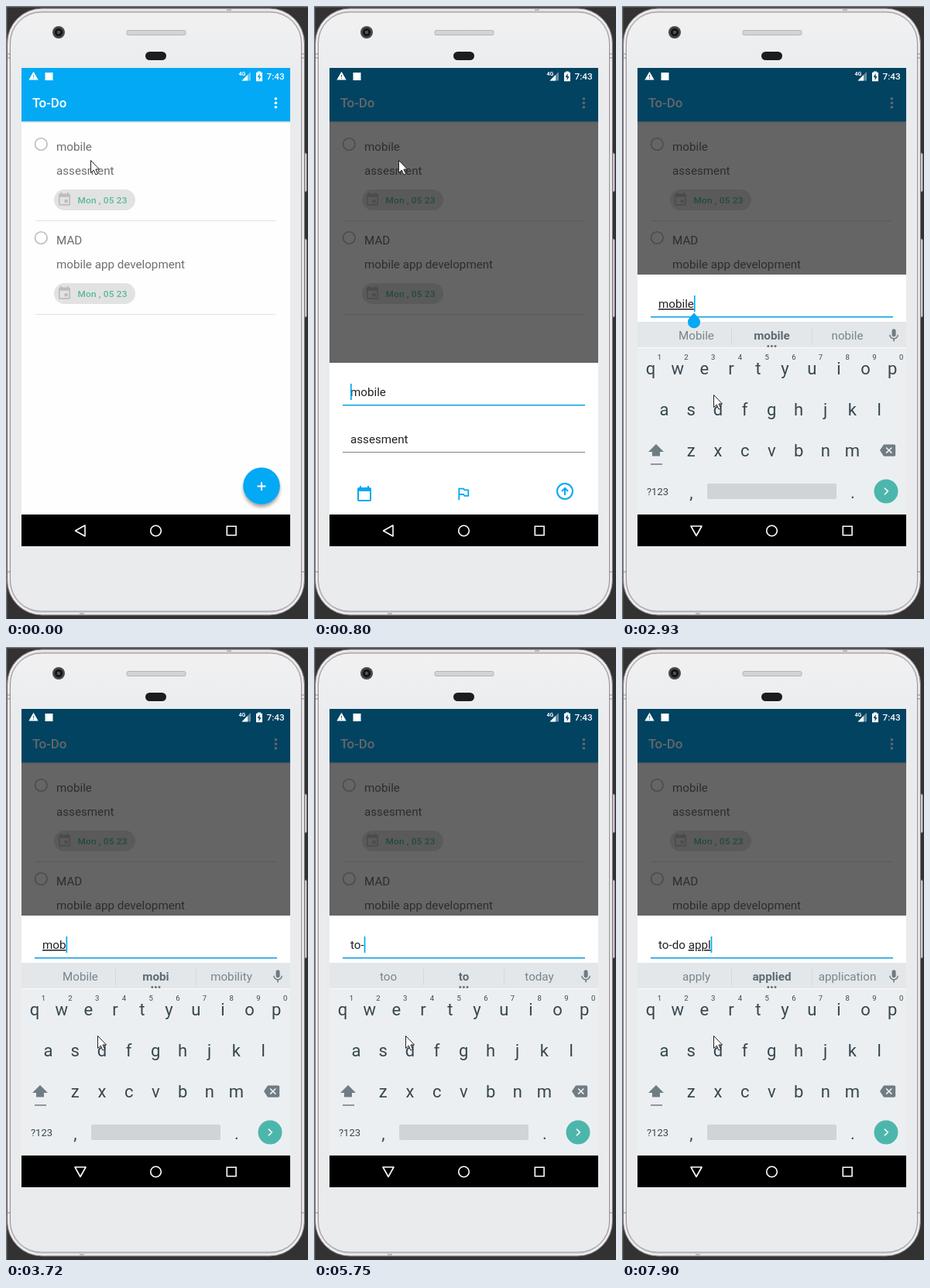
Animation of 390x792 px, one loop 8 s. Source, as an HTML page:

```html
<!DOCTYPE html>
<html lang="en">
<meta charset="utf-8">
<title>To-Do</title>
<style>
  html, body { margin: 0; width: 100%; height: 100%; overflow: hidden; background: #323232 }
  svg { display: block; font: 15.18px Roboto, sans-serif }
  .line { fill: none; stroke-width: 1.6 }
  .mid { text-anchor: middle }
  #composing { text-decoration: underline }
  #field { white-space: pre }
</style>
<svg width="390" height="792" viewBox="0 0 390 792">
  <defs>
    <clipPath id="screen"><path d="M20 80h347v577H20z"/></clipPath>
    <linearGradient id="shell" x2="0" y2="1">
      <stop stop-color="#f1f1f2"/><stop offset=".12" stop-color="#e9ebed"/><stop offset="1" stop-color="#e9ebed"/>
    </linearGradient>
    <filter id="soft" x="-30%" y="-30%" width="160%" height="160%"><feGaussianBlur stdDeviation="2.2"/></filter>
    <path id="calendar" fill-rule="evenodd" d="M19 3h-1V1h-2v2H8V1H6v2H5a2 2 0 0 0-2 2v14a2 2 0 0 0 2 2h14a2 2 0 0 0 2-2V5a2 2 0 0 0-2-2zm0 16H5V8h14z"/>
  </defs>

  <!-- phone -->
  <path fill="#323232" d="M0 0h390v792H0z"/>
  <path class="line" stroke="#777" d="M0 .8h390M.5 0v792"/>
  <g fill="#cfcacd" stroke="#77747a">
    <rect x="383" y="190" width="5.5" height="50" rx="2"/>
    <rect x="383" y="301" width="5.5" height="101" rx="2"/>
    <rect x="1.5" y="3" width="384" height="784" rx="45" fill="#d8d3d6"/>
  </g>
  <rect x="3.5" y="5" width="380" height="780" rx="43" fill="none" stroke="#f5f2f4" stroke-width="1.5"/>
  <rect x="5.5" y="8" width="376" height="774" rx="40" fill="url(#shell)" stroke="#989498"/>
  <path stroke="#8b888c" d="M2 62h4M2 67h4M381 62h4M381 67h4M2 731h4M381 731h4M285 5h6M95 785h6"/>
  <circle cx="68" cy="34" r="8" fill="#48484a"/>
  <circle cx="68" cy="34" r="5.2" fill="#161618"/>
  <circle cx="68" cy="34" r="2.2" fill="#505459"/>
  <rect x="156" y="31.5" width="76" height="6" rx="2" fill="#d3d4d5" stroke="#b4b5b6"/>
  <rect x="180" y="59" width="27" height="11" rx="5.5" fill="#1b1d1f"/>

  <!-- task list -->
  <path fill="#fefefe" d="M20 80h347v577H20z"/>
  <path fill="#03a9f4" d="M20 80h347v69H20z"/>
  <path fill="#c8dbe4" d="M20 149h347v1.6H20z"/>
  <text x="34" y="131" font-size="16.87" font-weight="500" fill="#fff">To-Do</text>
  <g fill="#fff"><circle cx="348.4" cy="119.7" r="1.8"/><circle cx="348.4" cy="125.2" r="1.8"/><circle cx="348.4" cy="130.7" r="1.8"/></g>
  <g id="tasks"></g>
  <circle cx="330" cy="624" r="23.5" opacity=".35" filter="url(#soft)"/>
  <circle cx="330" cy="620" r="23.8" fill="#03a9f4"/>
  <path stroke="#fff" stroke-width="2" d="M324.5 620.5h11M330 615v11"/>

  <path id="dim" d="M20 80h347v577H20z"/>

  <!-- status bar -->
  <g fill="#fff">
    <path fill-rule="evenodd" transform="translate(28.8 83.7) scale(.56)" d="M1 21h22L12 2zm12-3h-2v-2h2zm0-4h-2v-4h2z"/>
    <path d="M50.5 86h10v10h-10z"/>
    <text x="300.5" y="90" font-size="7" font-weight="700">4G</text>
    <path opacity=".4" d="M316 85v11.5h-11.5z"/>
    <path d="M312 89v7.5h-7.5z"/>
    <path fill-rule="evenodd" d="M325 84.5h4v1.3h2v11.4h-8V85.800h2zM327.600 87l-3 5h2v4l3-5h-2z"/>
    <text x="336.500" y="95" font-size="11.8" font-weight="500">7:43</text>
  </g>

  <g clip-path="url(#screen)">
    <!-- edit sheet -->
    <g id="sheet">
      <path fill="#fff" d="M20 461h347v320H20z"/>
      <path stroke="#0a9ee2" stroke-width="1.6" d="M37 515.700h313"/>
      <path stroke="#808080" d="M37 576.500h313"/>
      <text id="hint" x="47" y="504" fill="#999">Title</text>
      <text id="field" x="47" y="504" fill="#212121"><tspan id="plain"></tspan><tspan id="composing"></tspan></text>
      <rect id="caret" y="488" width="1.700" height="21" fill="#03a9f4"/>
      <text x="47" y="565" fill="#212121">assesment</text>
      <g fill="#03a9f4">
        <use href="#calendar" x="53" y="619"/>
        <path fill-rule="evenodd" transform="translate(181.800 619) scale(.92)" d="M14 6l-1-2H5v17h2v-7h5l1 2h7V6zm4 8h-4l-1-2H7V6h5l1 2h5z"/>
      </g>
      <g class="line" stroke="#03a9f4" style="stroke-width:2"><circle cx="324" cy="627" r="10"/><path d="M324 632v-9M320 627l4-4 4 4"/></g>
    </g>

    <!-- keyboard -->
    <g id="keyboard">
      <path fill="#eceff1" d="M20 408h347v249H20z"/>
      <path fill="#e3e7e9" d="M20 408h347v33H20z"/>
      <path stroke="#f8f9fa" d="M20 441.500h347"/>
      <path stroke="#d2d8db" d="M141.500 416v21M245.500 416v21"/>
      <g class="mid" fill="#7a858b">
        <text id="left" x="96" y="431"></text>
        <text id="middle" x="193.500" y="431" font-weight="700" fill="#5e6b72"></text>
        <text id="right" x="291" y="431"></text>
      </g>
      <path id="dots" stroke="#5e6b72" stroke-width="2.600" d="M187.500 439.500h2.600m2 0h2.600m2 0h2.600"/>
      <g fill="#6f7c83">
        <path transform="translate(341 415.500) scale(.84)" d="M12 14a3 3 0 0 0 3-3V5a3 3 0 0 0-6 0v6a3 3 0 0 0 3 3zm5.300-3c0 3-2.500 5.100-5.300 5.100S6.700 14 6.700 11H5c0 3.400 2.700 6.200 6 6.700V21h2v-3.300c3.300-.5 6-3.300 6-6.700z"/>
        <path d="M44 566l10 10h-5v5.500H39V576h-5zM37 591.200h15v1.600H37z"/>
        <path fill-rule="evenodd" transform="translate(333 564) scale(.84)" d="M22 3H7c-.7 0-1.200.4-1.600.9L0 12l5.400 8.100c.4.5.9.9 1.600.9h15a2 2 0 0 0 2-2V5a2 2 0 0 0-2-2zm-3 12.600L17.600 17 14 13.400 10.400 17 9 15.600 12.600 12 9 8.400 10.400 7 14 10.600 17.600 7 19 8.400 15.400 12z"/>
      </g>
      <g id="keys" class="mid" fill="#37474f"></g>
      <rect x="110" y="617" width="167" height="20" rx="2" fill="#cfd4d6"/>
      <circle cx="341" cy="627" r="15.500" fill="#4db6ac"/>
      <path class="line" stroke="#fff" d="M339 622.800l4.300 4.200-4.300 4.200"/>
    </g>
    <path id="handle" fill="#03a9f4" d="M93 396.500l6 6.500a8 8 0 1 1-12 0z"/>
  </g>

  <!-- navigation bar -->
  <path d="M20 657h347v41H20z"/>
  <g class="line" stroke="#fff">
    <path id="back" stroke-linejoin="round" d="M89.500 678l12.500-7v14z"/>
    <circle cx="193.500" cy="678" r="6.800"/>
    <path d="M285.300 672.300h11.800v11.400h-11.800z"/>
  </g>

  <path id="pointer" fill="#fff" stroke="#222" d="M.5.5V16.500L4.200 13l2.700 6 2.600-1.200L6.900 12H11.500z"/>
</svg>
<script>
const $ = id => document.getElementById(id);

const task = (y, title, note) => `<g transform="translate(0 ${y})">
  <circle class="line" cx="45.300" cy="178.500" r="7.800" stroke="#bababa"/>
  <g fill="#6e6e6e"><text x="65" y="187">${title}</text><text x="65" y="218">${note}</text></g>
  <rect x="62" y="237" width="105" height="27" rx="13.500" fill="#e2e2e2"/>
  <g fill="#bdbdbd" transform="translate(65.400 240) scale(.84)"><use href="#calendar"/><path d="M12 12h5v5h-5z"/></g>
  <text x="92.500" y="254.500" font-size="11.800" font-weight="500" letter-spacing=".2" fill="#58b998">Mon , 05 23</text>
  <path stroke="#e2e2e2" d="M38 277.500h310"/></g>`;
$('tasks').innerHTML = task(0, 'mobile', 'assesment') + task(121, 'MAD', 'mobile app development');

const key = (x, y, label, size = 22) => `<text x="${x}" y="${y}" font-size="${size}">${label}</text>`;
const row = (letters, x, y, size) => [...letters].map((c, i) => key(x + 34.700 * i, y, c, size)).join('');
$('keys').innerHTML = row('qwertyuiop', 37, 476) + row('1234567890', 48.300, 457, 9.500) +
  row('asdfghjkl', 54.500, 529) + row('zxcvbnm', 89.300, 582) +
  key(46, 632, '?123', 13) + key(89.500, 636, ',') + key(298, 636, '.');

// Each cue overrides part of the state from its time on.
// caret: 0 hidden, 1 at the start, 2 at the end of the text
const words = (left, middle, right) => ({ left, middle, right });
const typed = (composing, plain = '') => ({ composing, plain, caret: 2 });
const cues = [
  [0, { dim: 0, sheet: 196, keyboard: 249, turn: 0, handle: 0, dots: 1, caret: 1, composing: '', plain: 'mobile',
        pointer: [109, 199], ...words('Mobile', 'mobile', 'nobile') }],
  [680, { dim: .35, sheet: 90 }],
  [800, { dim: .6, sheet: 0 }],
  [1050, { caret: 0 }],
  [1300, { pointer: [106, 211] }],
  [1450, { pointer: [108, 245] }],
  [1570, { pointer: [115, 340], caret: 1 }],
  [1690, { pointer: [124, 450] }],
  [1810, { pointer: [130, 519] }],
  [1960, { pointer: [122, 508], caret: 0 }],
  [2110, { pointer: [118, 502] }],
  [2540, { caret: 1 }],
  [2660, { caret: 2 }],
  [2810, { sheet: -57, keyboard: 125, turn: -45 }],
  [2930, { ...typed('mobile'), sheet: -114, keyboard: 0, turn: -90, handle: 1 }],
  [3480, { ...typed('mobil'), handle: 0 }],
  [3600, { ...typed('mobi'), ...words('Mobile', 'mobil', 'mobility') }],
  [3720, { ...typed('mob'), ...words('Mobile', 'mobi', 'mobility') }],
  [3840, { ...typed('mo'), ...words('Mobile', 'mob', 'mobs') }],
  [3990, { ...typed('m'), ...words('more', 'mo', 'move') }],
  [4140, { ...typed(''), middle: 'm' }],
  [4390, words('me', 'm', 'more')],
  [4640, { caret: 0 }],
  [4920, typed('t')],
  [5040, { ...typed('to'), ...words('the', 't', 'to') }],
  [5160, words('too', 'to', 'today')],
  [5750, typed('', 'to-')],
  [5900, typed('to-d')],
  [6030, words('Todd', 'told', 'toad')],
  [6560, { caret: 0 }],
  [6710, typed('to-do')],
  [6830, { ...typed('', 'to-do'), ...words('Todd', 'to-do', 'Todo') }],
  [7090, { ...typed('', 'to-do '), ...words('list', 'and', 'is'), dots: 0 }],
  [7240, { ...typed('a', 'to-do '), ...words('as', 'a', 'an'), dots: 1 }],
  [7390, typed('ap', 'to-do ')],
  [7510, words('app', 'ap', 'apps')],
  [7630, { ...typed('app', 'to-do '), ...words('appeared', 'app', 'appointed') }],
  [7780, typed('appl', 'to-do ')],
  [7900, words('apply', 'applied', 'application')]
];

const move = (id, x, y) => $(id).setAttribute('transform', `translate(${x} ${y})`);
const fade = (id, opacity) => $(id).setAttribute('opacity', opacity);

function draw(now) {
  const time = now % 8000;
  const s = Object.assign({}, ...cues.filter(([start]) => start <= time).map(cue => cue[1]));
  for (const id of ['left', 'middle', 'right', 'plain', 'composing']) $(id).textContent = s[id];
  fade('hint', s.plain + s.composing ? 0 : 1);
  fade('dim', s.dim);
  fade('dots', s.dots);
  fade('handle', s.handle);
  fade('caret', s.caret ? 1 : 0);
  $('caret').setAttribute('x', 47 + (s.caret == 2 ? $('field').getComputedTextLength() : 0));
  move('sheet', 0, s.sheet);
  move('keyboard', 0, s.keyboard);
  move('pointer', ...s.pointer);
  $('back').setAttribute('transform', `rotate(${s.turn} 96 678)`);
  requestAnimationFrame(draw);
}
requestAnimationFrame(draw);
</script>
</html>
```
